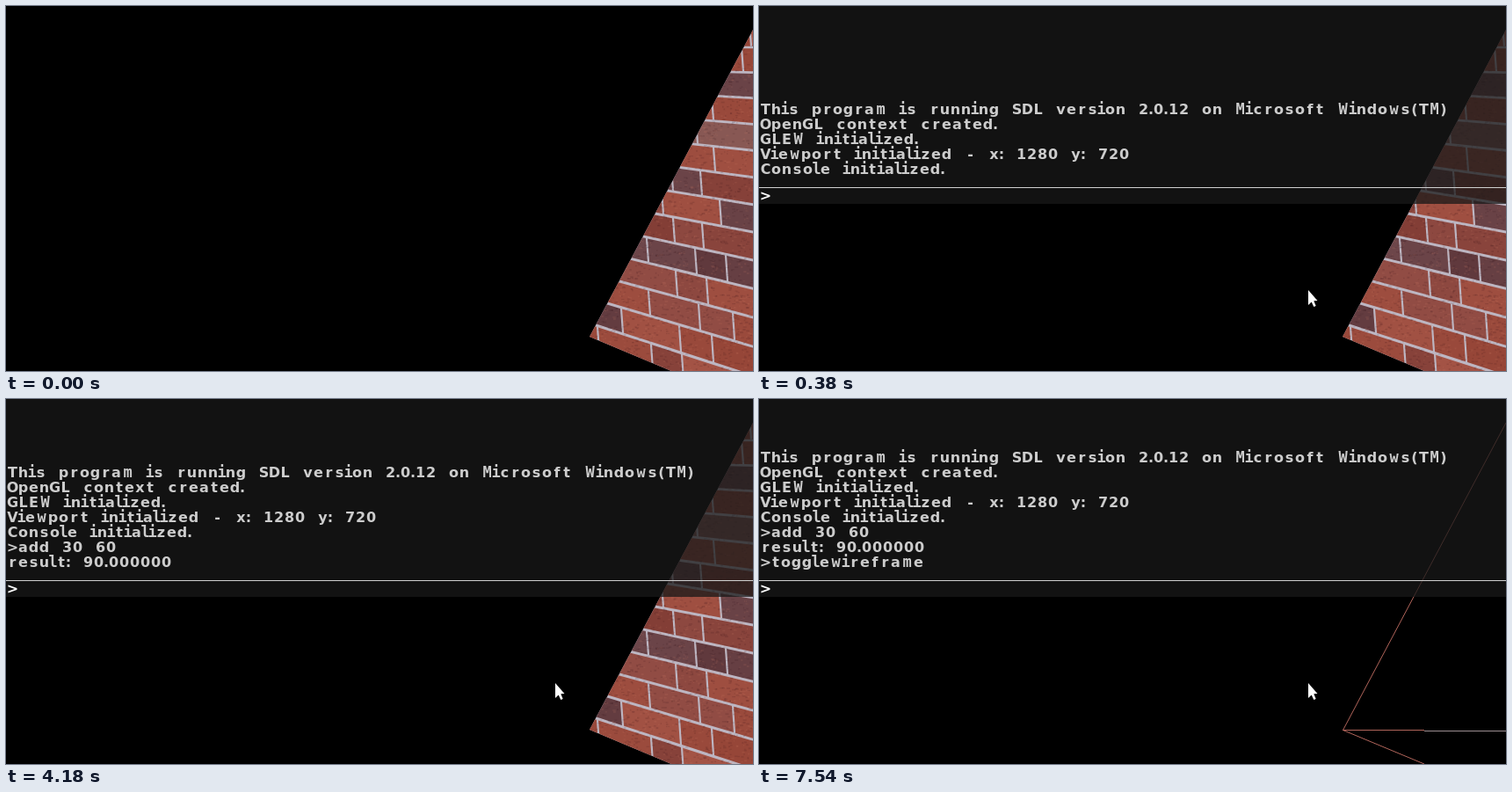
Animation of 850x415 px, one loop 8 s. Source, as an HTML page with a canvas:

```html
<!DOCTYPE html>
<html lang="en">
<head>
<meta charset="utf-8">
<title>Console</title>
<style>
html, body { margin: 0; width: 100%; height: 100%; overflow: hidden; background: #000; }
canvas { display: block; }
</style>
</head>
<body>
<canvas id="stage" width="850" height="415"></canvas>
<script>
const W = 850, H = 415, LOOP = 8000;
const ctx = document.getElementById('stage').getContext('2d');

const boot = [
  'This program is running SDL version 2.0.12 on Microsoft Windows(TM)',
  'OpenGL context created.',
  'GLEW initialized.',
  'Viewport initialized - x: 1280 y: 720',
  'Console initialized.'
];
const replies = { 'add 30 60': 'result: 90.000000' };
const keys = 'add 30 60\ntogglewireframe\n';
const keyTimes = [
  1810, 1900, 2050, 2200, 2560, 2700, 3200, 3860, 3950, 4180,
  5480, 5760, 5900, 6090, 6180, 6270, 6690, 6780, 6880, 6970,
  7110, 7200, 7300, 7390, 7440, 7540
];
const wireAt = 7540;
const slide = [[140, 0], [230, 5], [280, 103], [330, 201], [380, 225]];

// Console lettering: wide bold face, with slab letters for narrow and broad forms
function advance(c) {
  if (' mwW-'.includes(c)) return 14;
  if ('il'.includes(c)) return 8;
  if ('tf'.includes(c)) return 11;
  if ('()'.includes(c)) return 9;
  if ('.:'.includes(c)) return 5;
  return 12;
}

function print(text, baseline, color) {
  let x = 2;
  ctx.fillStyle = color;
  ctx.textAlign = 'center';
  for (const c of text) {
    ctx.font = /[MWmwil]/.test(c)
      ? 'bold 17px "DejaVu Sans Mono", monospace'
      : 'bold 16px "DejaVu Sans", sans-serif';
    const step = advance(c);
    ctx.fillText(c, x + (step - 1) / 2, baseline);
    x += step;
  }
}

function path(g, points) {
  g.beginPath();
  points.forEach(([x, y]) => g.lineTo(x, y));
}

// Brick wall in perspective: beds get steeper from course to course
const tones = { r: [156, 76, 62], m: [138, 69, 61], d: [102, 63, 67], g: [132, 84, 80] };
const courses = [
  [[847], 'rr'], [[838], 'rr'], [[], 'd'], [[804], 'rr'], [[786], 'gg'],
  [[806], 'rr'], [[758, 791], 'ddm'], [[747, 813], 'mrd'], [[760, 793], 'mmm'],
  [[730, 785, 820], 'dddd'], [[763, 798], 'mmr'], [[732, 789, 828], 'rmmr'],
  [[701, 767, 804], 'drrr'], [[674, 735, 770], 'rrmr']
];
const bed = (k, x) => 47 + 28.4 * k + 0.23 * k * k + 0.027 * k * (x - W);

function buildWall() {
  const wall = document.createElement('canvas');
  wall.width = W;
  wall.height = H;
  const g = wall.getContext('2d');
  let seed = 7;
  const rand = () => (seed = seed * 16807 % 2147483647) / 2147483647;

  path(g, [[850, 27], [664, 376], [757, 415], [850, 415]]);
  g.clip();
  g.fillStyle = '#bdb6c2';
  g.fillRect(0, 0, W, H);

  courses.forEach(([joints, shades], row) => {
    const ends = [640, ...joints, 870];
    [...shades].forEach((shade, i) => {
      const a = ends[i] + 1.1, b = ends[i + 1] - 1.1;
      const shift = rand() * 16 - 8;
      g.fillStyle = `rgb(${tones[shade].map(v => v + shift).join()})`;
      path(g, [
        [a - 1, bed(row - 1, a) + 1.3], [b - 1, bed(row - 1, b) + 1.3],
        [b + 1, bed(row, b) - 1.3], [a + 1, bed(row, a) - 1.3]
      ]);
      g.fill();
    });
  });

  for (let i = 0; i < 3500; i++) {
    g.fillStyle = rand() < 0.6 ? 'rgba(40,15,20,.13)' : 'rgba(215,130,110,.12)';
    g.fillRect(660 + rand() * 190, 27 + rand() * 388, 1 + rand() * 3, 1 + rand());
  }
  return wall;
}
const wall = buildWall();

function line(x1, y1, x2, y2, color) {
  path(ctx, [[x1, y1], [x2, y2]]);
  ctx.strokeStyle = color;
  ctx.lineWidth = 1;
  ctx.stroke();
}

function drawWire() {
  const red = '#b0645a';
  line(850, 27, 664.5, 376.5, red);
  line(664.5, 376.5, 757, 415, red);
  line(664, 376.5, 757, 376.5, red);
  line(757, 377.5, 850, 377.5, '#9c8e92');
}

function drawPointer() {
  path(ctx, [
    [625, 323], [625, 340], [628.7, 336.5], [631.3, 342],
    [633.7, 341], [631.3, 335.3], [635.5, 335]
  ]);
  ctx.fillStyle = '#fff';
  ctx.fill();
}

function consoleAt(t) {
  const log = [...boot];
  let input = '';
  keyTimes.forEach((time, i) => {
    if (t < time) return;
    if (keys[i] !== '\n') {
      input += keys[i];
      return;
    }
    log.push('>' + input);
    if (replies[input]) log.push(replies[input]);
    input = '';
  });
  return { log, input };
}

function drawConsole(t) {
  const bottom = slide.reduce((y, [time, next]) => t >= time ? next : y, 0);
  if (!bottom) return;
  const { log, input } = consoleAt(t);
  ctx.fillStyle = 'rgba(25,25,25,.75)';
  ctx.fillRect(0, 0, W, bottom);
  ctx.fillStyle = '#d0d0d0';
  ctx.fillRect(0, bottom - 19, W, 1);
  log.forEach((text, i) => print(text, bottom - 34 - 17 * (log.length - 1 - i), '#ccc'));
  print('>' + input, bottom - 4, '#fff');
}

function draw() {
  const t = performance.now() % LOOP;
  ctx.fillStyle = '#000';
  ctx.fillRect(0, 0, W, H);
  if (t < wireAt) ctx.drawImage(wall, 0, 0);
  else drawWire();
  drawConsole(t);
  if (t >= slide[0][0]) drawPointer();
  requestAnimationFrame(draw);
}
draw();
</script>
</body>
</html>
```
